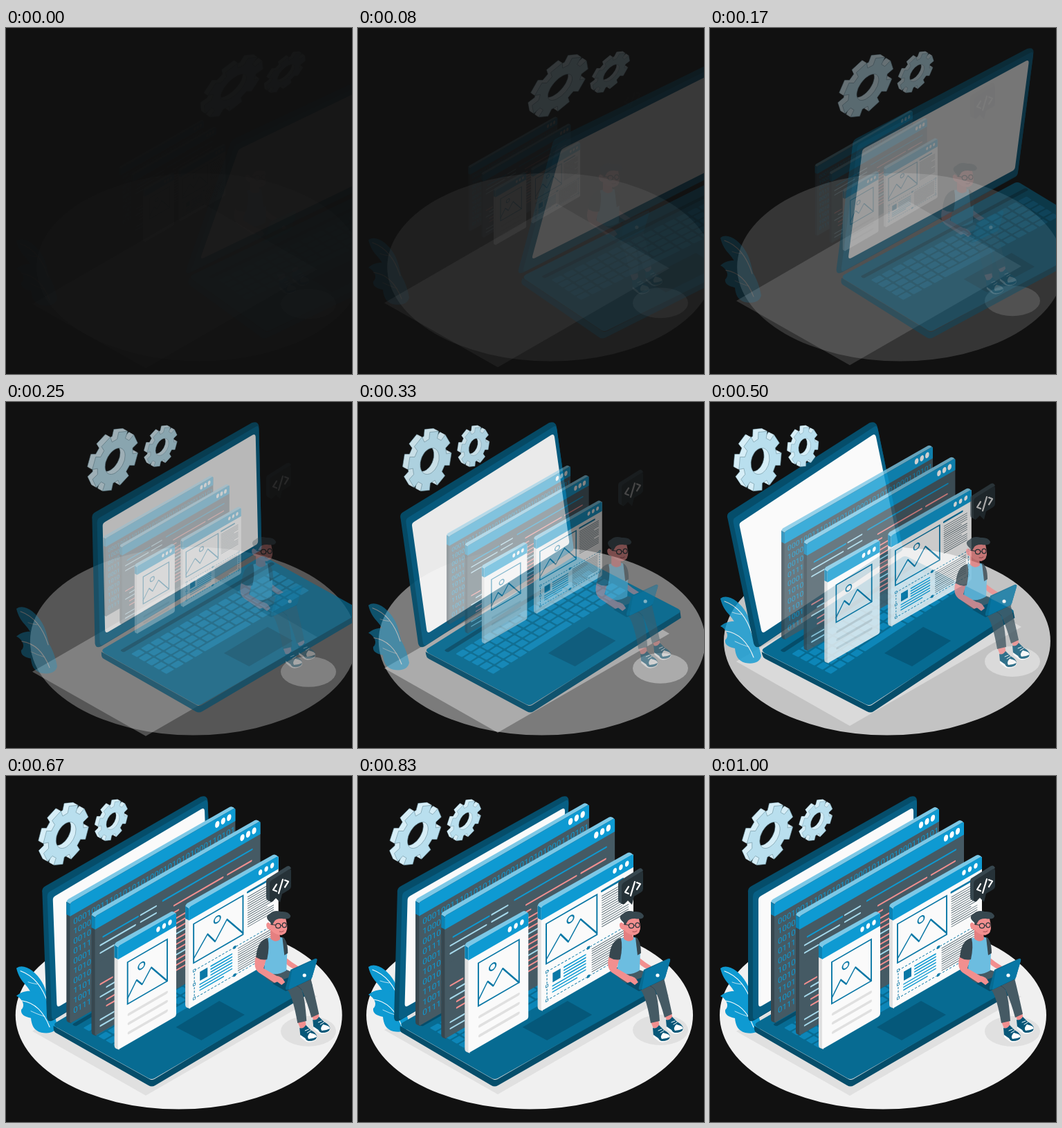
Write an HTML page that moves like this. It is 500x500 px and loops after 1.04 s.

```html
<!DOCTYPE html>
<html lang="en">
<head>
<meta charset="utf-8">
<title>Web development</title>
<style>
html, body { margin: 0; width: 100%; height: 100%; overflow: hidden; background: #111; }
svg { display: block; width: 100vw; height: 100vh; }
text { font: 11.5px Roboto, "Liberation Sans", sans-serif; }
</style>
</head>
<body>
<svg id="stage" viewBox="0 0 500 500"></svg>
<script>
const BLUE = '#0e9ad2', DEEP = '#076b92', NAVY = '#054d6a', SKY = '#7cc8e6', INKBLUE = '#0a78a6';
const SLATE = '#455a64', DARK = '#37474f', INK = '#263238', PINK = '#f28f8f';
const PAPER = '#fafafa', GREY = '#e0e0e0';

// Drawing helpers
const path = (d, fill, extra = '') => `<path d="${d}" fill="${fill}" ${extra}/>`;
const line = (d, color, width = 1, extra = '') =>
  path(d, 'none', `stroke="${color}" stroke-width="${width}" stroke-linecap="round" stroke-linejoin="round" ${extra}`);
const rect = (x, y, w, h, fill, r = 0, extra = '') =>
  `<rect x="${x}" y="${y}" width="${w}" height="${h}" rx="${r}" fill="${fill}" ${extra}/>`;
const oval = (x, y, rx, ry, fill, extra = '') =>
  `<ellipse cx="${x}" cy="${y}" rx="${rx}" ry="${ry}" fill="${fill}" ${extra}/>`;
const wall = (x, y, body) => `<g transform="matrix(1 -.577 0 1 ${x} ${y})">${body}</g>`;
const floor = (x, y, body) => `<g transform="matrix(1 -.577 1 .577 ${x} ${y})">${body}</g>`;
const repeat = (n, f) => Array.from({ length: n }, (_, i) => f(i)).join('');

function gear(x, y, size) {
  let d = '';
  for (let i = 0; i < 8; i++) {
    const a = (i - .5) * Math.PI / 4;
    for (const [da, r] of [[-.25, 30], [-.21, 39], [.21, 39], [.25, 30]])
      d += `${d ? 'L' : 'M'}${r * Math.cos(a + da)} ${r * Math.sin(a + da)}`;
  }
  d += 'ZM17 0A17 17 0 1 0-17 0A17 17 0 1 0 17 0Z';
  const layer = (k, fill, edge) => `<g transform="matrix(${.866 * size} ${-.5 * size} 0 ${size} ${x - k * size} ${y - .58 * k * size})">` +
    path(d, fill, `fill-rule="evenodd" stroke="${edge}" stroke-width=".6" stroke-linejoin="round"`) + '</g>';
  return layer(7, '#d6eef7', '#6d909e') + repeat(6, i => layer(6 - i, '#d6eef7', '#d6eef7')) + layer(0, '#b9dfee', '#6d909e');
}

function panel(x, y, w, h, body, side, content) {
  const head = 19, rise = .577 * w, small = w < 200;
  const dots = [26, 17.5, 9].map(k => oval(w - k, 9, small ? 2.7 : 3.1, small ? 3.8 : 4.6, '#fff')).join('');
  return path(`M${x - 5} ${y}Q${x - 5} ${y - 4} ${x - 2} ${y - 6}L${x + w - 8} ${y - rise - 1}Q${x + w - 4} ${y - rise - 3} ${x + w} ${y - rise + 2}L${x + 2} ${y + 5}Z`, SKY) +
    path(`M${x - 5} ${y - 2}L${x + 2} ${y + 2}V${y + h}L${x - 3} ${y + h - 2}Q${x - 5} ${y + h - 3} ${x - 5} ${y + h - 6}Z`, side) +
    path(`M${x - 5} ${y - 2}L${x + 1} ${y + 2}V${y + head}L${x - 5} ${y + head - 3}Z`, '#0b82b3') +
    wall(x, y, rect(0, 0, w, h, body, 3) + path(`M0 ${head}V3Q0 0 3 0H${w - 3}Q${w} 0 ${w} 3V${head}Z`, BLUE) + dots + content);
}

function picture(x, y, w, h, hills, sun) {
  return rect(x, y, w, h, 'none', 0, `stroke="${INKBLUE}" stroke-width="1.9"`) + line(hills, INKBLUE, 1.9) +
    oval(...sun, 4.5, 4.5, 'none', `stroke="${INKBLUE}" stroke-width="1.9"`);
}

function binary() {
  const starts = '00010 10001 00101 01110 00010 10101 00101 11010 10010 01110'.split(' ');
  return starts.map((s, i) => `<text x="5" y="${34 + i * 14.2}" fill="${BLUE}">${s}${i ? '' : '0111010101010001010101000110101'}</text>`).join('');
}

function code() {
  const pale = '#a5d8ea';
  const rows = [
    [36, 12, 50, BLUE], [36, 66, 22, pale], [34, 98, 128, BLUE],
    [46, 8, 50, pale], [46, 66, 22, pale], [50, 114, 70, PINK], [50, 191, 34, PINK],
    [57, 8, 19, pale], [60, 40, 80, PINK], [68, 8, 40, SLATE],
    [102, 8, 17, PINK], [111, 17, 12, pale], [120, 8, 20, pale], [129, 17, 12, PINK],
    [138, 17, 12, PINK], [153, 8, 19, pale], [162, 8, 19, pale]];
  return rows.map(([v, u, n, c]) => line(`M${u} ${v}h${n}`, c, 2.3)).join('') +
    repeat(11, i => line(`M112 ${70 + i * 7.5}h24`, i % 4 == 3 ? pale : PINK, 2.2));
}

function article() {
  const [l, m, r, t, b] = [8, 66, 124, 95.5, 135.5];
  const handles = [[l, t], [m, t], [r, t], [l, (t + b) / 2], [l, b], [m, b], [r, b]];
  return picture(7, 28, 71, 56, 'M7 78L27 54L38 71L55 49L78 82', [41, 41]) +
    line('M85 27h29', INKBLUE, 3) +
    repeat(14, i => line(`M85 ${34 + i * 3.3}h${i % 5 == 4 ? 28 : 37}`, SLATE, .9)) +
    repeat(11, i => line(`M71 ${100 + i * 3.2}h${i == 10 ? 30 : 49}`, SLATE, .9)) +
    rect(16, 102, 11, 13, INKBLUE) +
    repeat(4, i => line(`M32 ${103 + i * 4.2}h30`, BLUE, 1.8)) +
    repeat(3, i => line(`M16 ${120 + i * 4.2}h${i == 2 ? 34 : 46}`, BLUE, 1.6)) +
    rect(l, t, r - l, b - t, 'none', 0, `stroke="${INKBLUE}" stroke-dasharray="3 2"`) +
    handles.map(([x, y]) => rect(x - 1.6, y - 1.6, 3.2, 3.2, x == m ? INKBLUE : PAPER, .5, `stroke="${INKBLUE}" stroke-width=".8"`)).join('');
}

function laptop() {
  const keys = repeat(5, r => repeat(15, c => r == 4 && c > 3 && c < 9 ? '' :
    rect(c * 14.1, r * 10.5, 11.6, 8.3, '#0d86b8', 1.2))) + rect(4 * 14.1, 42, 68, 8.3, '#0d86b8', 1.2);
  return path('M64 361L200 438Q203 440 207 438L440 301V312L208 447Q203 450 198 447L67 371Q64 369 64 365Z', NAVY) +
    path('M68 356L296 224Q300 222 304 224L438 299Q442 302 438 305L207 437Q203 439 199 437L68 363Q63 359 68 356Z', DEEP) +
    floor(91, 359, rect(0, 0, 222, 5, NAVY, 2)) +
    floor(107, 364, keys) +
    path('M241 363L305 325L341 345L277 382Z', '#05587a') +
    path('M55 169Q54 162 60 159L289 30Q298 27 299 35V210Q299 214 295 216L64 353Q56 357 55 349Z', NAVY) +
    path('M62 175Q62 169 66 167L294 36Q299 33 299 40V208Q299 213 295 215L68 350Q62 354 62 347Z', '#075f84') +
    path('M70 179Q70 175 74 173L289 48Q294 45 294 51V201Q294 205 290 207L75 332Q70 335 70 329Z', PAPER);
}

function person() {
  const shoe = (x, y) => `<g transform="translate(${x} ${y})">` +
    path('M0 2Q5 4 9-2L16 5Q25 10 25 15Q24 21 13 21Q10 21 8 17L1 13Z', '#075778') +
    path('M15 9Q25 11 25 15Q24 22 13 21Q10 21 8 17L1 12V15L7 20Q11 24 18 22Q26 20 25 15Q19 18 13 18Q10 14 15 9Z', '#fff') +
    line('M8 6l5-2M11 9l5-3', '#fff', 1) + '</g>';
  return path('M421 355L432 352L434 364L425 365Z', PINK) + path('M441 346L451 342L453 352L445 354Z', PINK) +
    path('M370 281Q371 292 385 299L408 311Q415 323 421 357L434 354Q432 322 427 309L404 280Z', SLATE) +
    path('M404 280L440 292Q446 316 452 344L441 349Q436 330 427 308L395 290Z', SLATE) +
    line('M427 309Q424 304 415 301', DARK, 1) +
    shoe(424, 362) + shoe(443, 350) +
    path('M403 255L405 263Q412 269 422 275L418 280Q406 275 401 267Z', PINK) +
    path('M377 235Q390 230 401 234Q406 240 406 255L405 281Q389 291 373 282L374 255Z', '#6cbde0') +
    path('M399 233Q407 237 407 256L402 259Z', DARK) +
    path('M382 221L395 226L396 236Q389 242 382 235Z', '#e57f80') +
    path('M361 260L376 263L372 278L391 289Q400 291 403 299L391 301L365 284Q356 277 361 260Z', PINK) +
    path('M378 234Q363 237 361 262Q369 267 377 265Q381 247 378 234Z', DARK) +
    path('M382 207Q394 201 404 206L406 216Q407 228 398 230Q389 230 383 223Q375 221 376 214Q378 209 382 214Z', PINK) +
    path('M380 210Q373 203 381 199Q387 193 397 196Q408 195 411 202Q411 208 398 206Q389 206 387 211L384 216Q382 211 380 210Z', DARK) +
    `<g fill="none" stroke="${INK}" stroke-width="1.2">` + oval(393, 216.5, 3.6, 3.3, 'none') + oval(402, 215.5, 3, 3.3, 'none') +
    '<path d="M382 214L389.4 215.5M396.6 216h2.4"/></g>' + line('M395 225q4 1 6-1', '#9c4a50', 1) +
    path('M385 300L404 311L442 293L424 285Z', NAVY) +
    path('M411 280L446 264Q450 263 449 267L442 291Q441 293 439 294L406 309Q403 309 404 305Z', DEEP) +
    path('M413 281L446 265Q450 263 449 267L442 291Q441 293 439 294L408 309Z', '#0877a5') +
    oval(431, 288, 2.6, 2.6, '#fff') +
    path('M388 289Q398 288 403 298L398 302L390 296Z', PINK);
}

function plant() {
  return path('M15 278C25 270 43 282 52 298C60 311 60 326 66 339L50 332C41 326 37 312 29 303C22 295 18 290 15 278Z', BLUE) +
    path('M15 318C27 307 48 309 58 323C68 335 72 351 74 361C72 371 62 373 51 371C40 368 37 360 36 350C27 348 21 345 22 338C28 333 25 323 15 318Z', BLUE) +
    line('M21 282Q49 292 61 330', '#fff', 1.1) + line('M23 325Q50 329 63 363', '#fff', 1.1) +
    line('M36 340Q44 344 56 348M45 301Q37 300 32 298', '#fff', .7);
}

function sign() {
  return path('M376 152Q376 148 379 147L406 130Q410 128 412 133L383 154L384 182L378 179Q376 178 376 175Z', DARK) +
    path('M381 155Q381 152 384 150L408 135Q412 132 412 137V159Q412 162 409 164L399 170L396 182L390 176L385 181Q381 182 381 178Z', INK) +
    line('M391 156L386 164L391 166M400 149L394 169M403 150L408 152L403 160', '#fff', 2.2);
}

const parts = {
  ground: oval(250, 345.5, 236, 136, '#f0f0f0'),
  shadow: path('M38 369L202 462L450 319L287 225Z', GREY) + oval(437, 369, 40, 22, GREY),
  plant: plant(),
  laptop: laptop(),
  panels: panel(93, 184, 238, 173, SLATE, DARK, binary()) +
    panel(129, 203, 238, 172, SLATE, DARK, code()) +
    panel(264, 190, 129, 146, PAPER, GREY, article()) +
    panel(162, 246, 84, 149, PAPER, GREY,
      picture(14, 31, 57, 60, 'M14 83L27 64L35 75L48 58L71 91', [34, 47.5]) +
      [107, 120, 133.5].map(v => line(`M16 ${v}h54`, GREY, 4)).join('')),
  person: person(),
  sign: sign(),
  gears: gear(86.5, 85.5, 1) + gear(155, 65, .66)
};
const stage = document.getElementById('stage');
stage.innerHTML = Object.entries(parts).map(([id, art]) => `<g id="${id}">${art}</g>`).join('');

// cubic-bezier(.36, -.01, .5, 1.38)
function ease(x) {
  if (x <= 0 || x >= 1) return x <= 0 ? 0 : 1;
  const curve = (s, a, b) => 3 * (1 - s) ** 2 * s * a + 3 * (1 - s) * s * s * b + s ** 3;
  let lo = 0, hi = 1;
  for (let i = 0; i < 30; i++) {
    const mid = (lo + hi) / 2;
    if (curve(mid, .36, .5) < x) lo = mid; else hi = mid;
  }
  return curve(lo, -.01, 1.38);
}

function pose(id, transform, opacity) {
  const g = document.getElementById(id);
  g.setAttribute('transform', transform);
  g.setAttribute('opacity', Math.min(1, Math.max(0, opacity)));
}

// Rush in from the right, leaning, then settle
function rush(id, u, cy) {
  const p = ease(u / .6), tan = deg => Math.tan(deg * Math.PI / 180);
  let shift = 0, lean;
  if (u < .6) {
    shift = 250 * (1 - p);
    lean = tan(-20) + (tan(10) - tan(-20)) * p;
  } else if (u < .8) lean = tan(10 - 12 * ease((u - .6) / .2));
  else lean = tan(-2) * (1 - ease((u - .8) / .2));
  pose(id, `matrix(1 0 ${lean} 1 ${shift - lean * cy} 0)`, u < .6 ? p : 1);
}

function draw(now) {
  const step = Math.min(24, Math.floor((now % 1040 + 4) / 41.67));  // 24 pictures a second
  const u = Math.min(1, (step + 1.28) / 25), p = ease(u), rest = 1 - p;
  pose('ground', `translate(${30 * rest} 0)`, p);
  pose('shadow', `translate(0 ${30 * rest})`, p);
  pose('plant', `translate(0 ${30 * rest})`, p);
  pose('panels', `translate(240 222) scale(${1 - rest / 2}) translate(-240 -222)`, p);
  pose('person', `translate(${-30 * rest} 0)`, p);
  pose('sign', `translate(0 ${-60 * rest})`, p * p);
  rush('laptop', u, 239);
  rush('gears', u, 81.5);
}

const start = performance.now();
function tick() {
  draw(performance.now() - start);
  requestAnimationFrame(tick);
}
tick();
</script>
</body>
</html>
```
